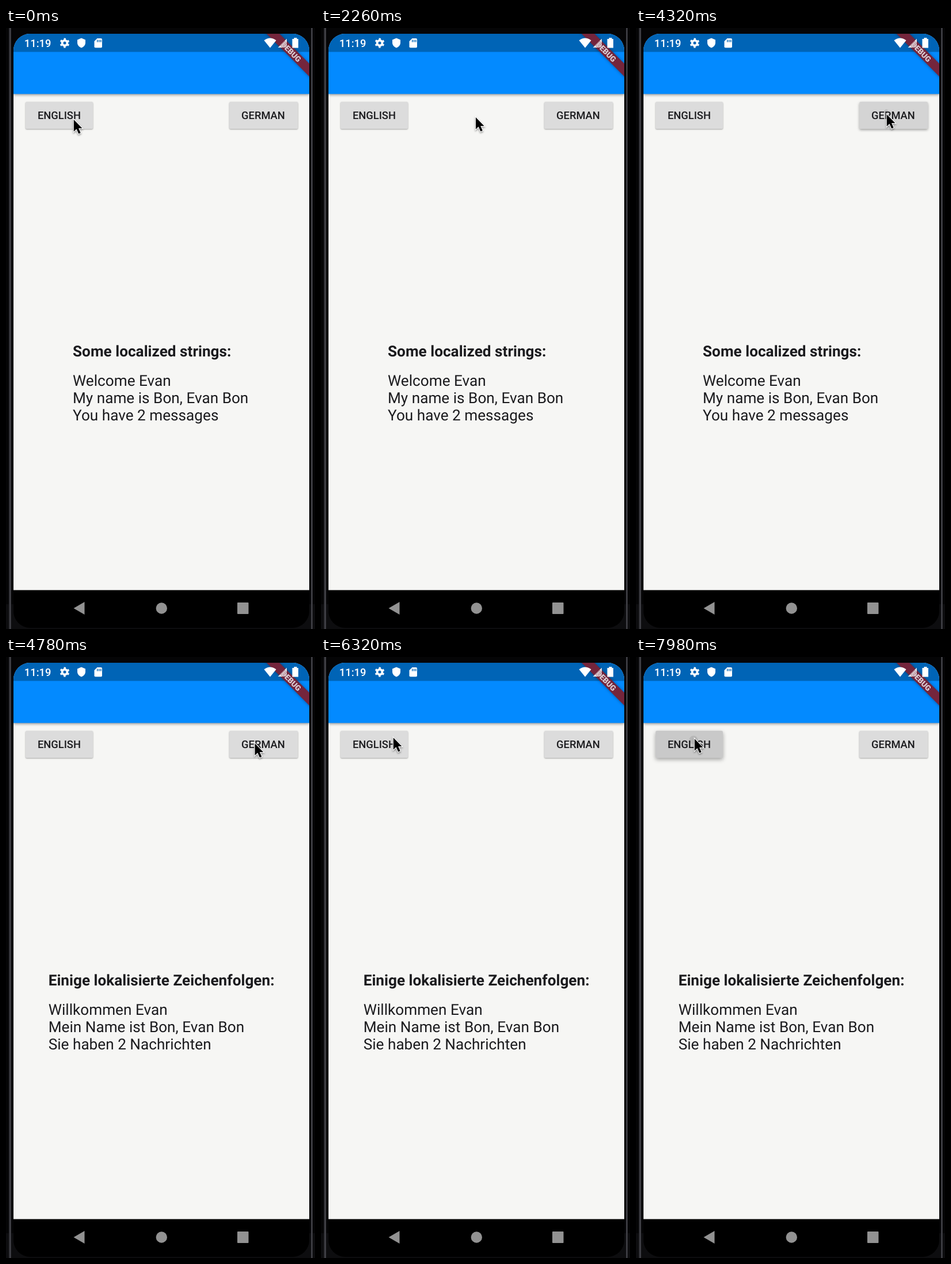
Write an HTML page that moves like this. It is 537 by 1043 pixels and loops after 8000 ms.

```html
<!DOCTYPE html>
<html lang="en">
<head>
<meta charset="utf-8">
<title>Localized strings</title>
<style>
  html, body { margin: 0; width: 100%; height: 100%; overflow: hidden; background: #050506; }
  svg { display: block; width: 537px; height: 1043px; font-family: Roboto, sans-serif; text-rendering: geometricPrecision; }
  .label { font-size: 18.33px; font-weight: 500; fill: #1b1b1e; }
  .copy { font-size: 26.18px; fill: #1b1b1e; }
  .copy .head { font-weight: 700; }
</style>
</head>
<body>
<svg viewBox="0 0 537 1043">
  <defs>
    <clipPath id="screen"><rect x="13" y="10" width="514" height="1031" rx="29"/></clipPath>
    <filter id="blur" x="-20%" y="-100%" width="140%" height="300%"><feGaussianBlur stdDeviation="2.5"/></filter>
  </defs>

  <!-- phone body -->
  <path fill="#0d0d0f" d="M0 1000H537V1043H0z"/>
  <path fill="#303035" d="M5 0h4v1043h-4zM530 0h3v1043h-3z"/>
  <path fill="#4a4a50" d="M7 0h1v1043h-1zM531 0h1v1043h-1z"/>

  <g clip-path="url(#screen)">
    <rect x="13" y="10" width="514" height="966" fill="#f6f6f4"/>
    <rect x="13" y="100" width="514" height="16" fill="#000" opacity=".42" filter="url(#blur)"/>
    <rect x="13" y="10" width="514" height="104.500" fill="#038aff"/>
    <rect x="13" y="10" width="514" height="31.500" fill="#0064b6"/>
    <rect x="13" y="975.500" width="514" height="66" fill="#000"/>

    <g id="buttons"></g>

    <g class="copy">
      <text class="head" y="570"/><text y="621"/><text y="651"/><text y="681"/>
    </g>

    <!-- debug ribbon -->
    <g transform="translate(527 10) rotate(45)">
      <rect x="-70" y="36.650" width="140" height="15.700" opacity=".4" filter="url(#blur)"/>
      <rect x="-70" y="36.650" width="140" height="15.700" fill="#74253c"/>
    </g>

    <!-- status bar -->
    <g fill="#fff">
      <text x="31.800" y="33" font-size="18.330" font-weight="500">11:19</text>
      <g fill="none" stroke="#fff">
        <circle cx="102" cy="26" r="4.400" stroke-width="3.800"/>
        <circle cx="102" cy="26" r="7" stroke-width="2.800" stroke-dasharray="3.330 4" stroke-dashoffset="-2"/>
      </g>
      <path d="M131 17.500l7 3v5c0 4-3 7.500-7 9-4-1.500-7-5-7-9v-5z"/>
      <path d="M158.500 18H165q2 0 2 2V32.500q0 1.800-1.800 1.800H155.300q-1.800 0-1.800-1.800V23z"/>
      <path fill="#0064b6" d="M158 20.500h1.500v4h-1.500zM161 20.500h1.500v4h-1.500zM164 20.500h1.500v4h-1.500z"/>
      <path d="M459 34.500L448.500 21.500Q459 13.500 469.500 21.500z"/>
      <path opacity=".85" d="M488 18.500V34H472.500z"/>
      <path d="M500.500 17h5v2h2.500v15.500h-10.500V19h3z"/>
    </g>
    <text transform="translate(527 10) rotate(45)" y="49.200" text-anchor="middle" font-size="13.350" font-weight="900" fill="#ddd0d5" stroke="#74253c" stroke-width=".9" paint-order="stroke">DEBUG</text>

    <!-- navigation bar -->
    <g fill="#929292">
      <path d="M117.500 1007L136.500 996V1018z"/>
      <circle cx="270.300" cy="1007" r="9.700"/>
      <rect x="402" y="997" width="19.500" height="20" rx="1"/>
    </g>
  </g>

  <g id="cursor">
    <path transform="translate(.8 2) scale(.86)" d="M0 0V24L5.500 19 9.800 28.500 13.800 26.700 9.700 17.500H17z" stroke="#fff" stroke-width="2.600" paint-order="stroke" style="filter:drop-shadow(0 2px 2px #0006)"/>
  </g>
</svg>
<script>
const LOOP = 8000, SWITCH = 4420;

const copies = {
  en: { x: 116, lines: ['Some localized strings:', 'Welcome Evan', 'My name is Bon, Evan Bon', 'You have 2 messages'] },
  de: { x: 73.7, lines: ['Einige lokalisierte Zeichenfolgen:', 'Willkommen Evan', 'Mein Name ist Bon, Evan Bon', 'Sie haben 2 Nachrichten'] }
};

// time, x, y of the pointer tip
const path = [
  [0, 117, 157], [1740, 117, 157], [2260, 268, 153], [3060, 384, 151], [3500, 435, 148],
  [4760, 435, 148], [5480, 322, 148], [6320, 125, 138], [6800, 101, 140], [LOOP, 101, 140]
];

const buttons = [
  { label: 'ENGLISH', x: 34, width: 117, press: 7830, release: 8100, tapX: 100 },
  { label: 'GERMAN', x: 388.2, width: 119, press: 4260, release: 4380, tapX: 435 }
];

const clamp = v => Math.min(1, Math.max(0, v));
const find = selector => document.querySelector(selector);
const textNodes = document.querySelectorAll('.copy text');
const cursor = find('#cursor');

buttons.forEach((b, i) => {
  const box = `x="${b.x}" y="128" width="${b.width}" height="47" rx="2.6"`;
  find('#buttons').insertAdjacentHTML('beforeend', `<g>
    <clipPath id="clip${i}"><rect ${box}/></clipPath>
    <rect ${box} fill="#dcdcdc"/>
    <circle cx="${b.tapX}" cy="144" clip-path="url(#clip${i})"/>
    <text class="label" x="${b.x + 20.9}" y="158">${b.label}</text></g>`);
  const group = find('#buttons').lastElementChild;
  b.face = group.querySelector(':scope > rect');
  b.ripple = group.querySelector('circle');
});

function drawButton(b, t) {
  const fade = 1 - clamp((t - b.release) / 225);
  const level = clamp((t - b.press) / 150) * fade;
  const grey = 220 - 19 * level;
  b.face.setAttribute('fill', `rgb(${grey},${grey},${grey})`);
  b.face.style.filter = `drop-shadow(0 ${1.3 + 2.5 * level}px ${1.3 + 2.5 * level}px rgba(0,0,0,.34))`;
  const held = clamp((Math.min(t, b.release) - b.press) / 1000) * 50;
  b.ripple.setAttribute('r', held + clamp((t - b.release) / 225) * 75);
  b.ripple.setAttribute('opacity', .09 * fade);
}

function pointerAt(t) {
  const i = path.findIndex(p => p[0] > t);
  const [t0, x0, y0] = path[i - 1], [t1, x1, y1] = path[i];
  const k = (t - t0) / (t1 - t0);
  return [x0 + (x1 - x0) * k, y0 + (y1 - y0) * k];
}

function draw(t) {
  const { x, lines } = t < SWITCH ? copies.en : copies.de;
  textNodes.forEach((node, i) => {
    node.setAttribute('x', x);
    node.textContent = lines[i];
  });
  buttons.forEach(b => drawButton(b, t));
  cursor.setAttribute('transform', `translate(${pointerAt(t)})`);
}

const start = performance.now();
function frame() {
  draw((performance.now() - start) % LOOP);
  requestAnimationFrame(frame);
}
frame();
</script>
</body>
</html>
```
